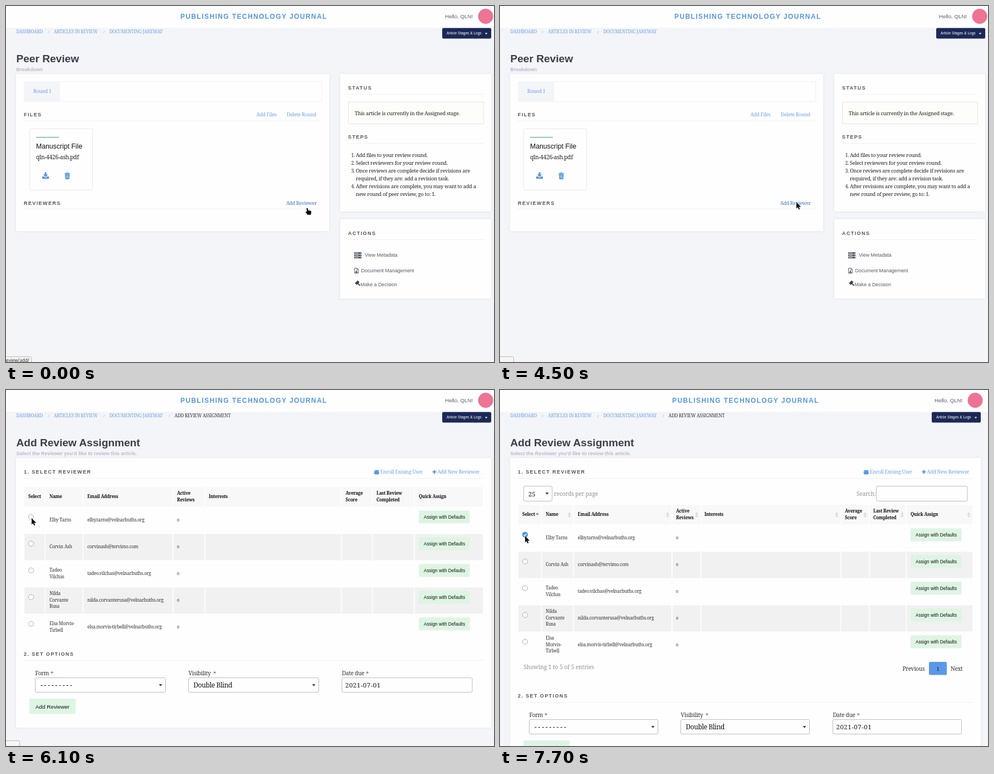
These frames come from a looping animation (876x639 px, 8000 ms). An HTML page:

```html
<!DOCTYPE html>
<html lang="en">
<head>
<meta charset="utf-8">
<title>Add a reviewer</title>
<style>
html, body { margin: 0; width: 100%; height: 100%; overflow: hidden; background: #f4f5f9; }
svg { display: block; width: 876px; height: 639px; }
text { white-space: pre; }
.s, .b { font-family: "Noto Serif", serif; letter-spacing: -.03em; }
.b { font-weight: 700; }
.w { font-family: "Noto Serif", serif; }
.n, .t, .h { font-family: "Liberation Sans", Arial, sans-serif; }
.t, .h { font-weight: 700; }
.h { letter-spacing: 1.4px; }
.u { font-family: "Noto Sans", sans-serif; }
.panel { filter: drop-shadow(0 0 2px rgba(40, 50, 80, .09)); }
</style>
</head>
<body>
<svg id="stage" viewBox="0 0 876 639"></svg>
<script>
(() => {
const LOOP = 8000, STEP = 100;
const BLUE = '#5596e3', LINK = '#6fa3e0', INK = '#333', GREEN = '#def5e3';

const text = (x, y, s, cls, size, fill = INK, more = '') =>
  `<text x="${x}" y="${y}" class="${cls}" font-size="${size}" fill="${fill}" ${more}>${s}</text>`;
const box = (x, y, x2, y2, fill, more = '') =>
  `<rect x="${x}" y="${y}" width="${x2 - x}" height="${y2 - y}" fill="${fill}" ${more}/>`;
const path = (d, fill, more = '') => `<path d="${d}" fill="${fill}" ${more}/>`;
const at = (x, y, s) => `<g transform="translate(${x} ${y})">${s}</g>`;
const rule = (x, x2, y) => box(x, y, x2, y + 1, '#f1f1f3');
const panel = (x, y, x2, y2) => box(x, y, x2, y2, '#fefefe', 'class="panel"');
const head = (x, y, s) => text(x, y, s, 'h', 9, '#555');
const lines = (x, mid, list, cls, size, gap, fill) => list.map((s, i) =>
  text(x, mid + 2.9 + (i - (list.length - 1) / 2) * gap, s, cls, size, fill)).join('');
const field = (x, y, x2, y2) =>
  box(x, y, x2, y2, '#fefefe', 'rx="2.5" stroke="#bdbdc1"');
const arrowDown = (x, y) => path(`M${x - 3} ${y - 2}h6l-3 4z`, '#444');

function banner(dx, crumbs) {
  let out = box(0, 0, 876, 39, '#fefefe')
    + text(313 + dx / 2, 23.2, 'PUBLISHING TECHNOLOGY JOURNAL', 'h', 12, BLUE)
    + text(788 + dx, 22, 'Hello, QLN!', 'n', 9.7, '#5a6070')
    + `<circle cx="${861 + dx}" cy="18.5" r="13.5" fill="#ee7394"/>`
    + box(783 + dx, 39.5, 871 + dx, 58.5, '#1b2957', 'rx="2.5"')
    + text(791 + dx, 51.4, 'Article Stages &amp; Logs', 'n', 6.55, '#fff')
    + path(`M${859.6 + dx} 48.5h4.8l-2.4 2.6z`, '#fff');
  const stops = [18.5, 86, 185.5, 302.5];
  crumbs.forEach((s, i) => {
    if (i) out += text(stops[i] - 10.5, 49, '/', 'n', 8, '#b3b5bd');
    out += text(stops[i], 48.6, s, 's', 8, i < 3 ? LINK : '#333');
  });
  return out;
}

const titles = (big, small) =>
  text(18.5, 101, big, 't', 19.1, '#3b3d4b') + text(18.5, 117.4, small, 't', 8.87, '#babcc6');
const trail = ['DASHBOARD', 'ARTICLES IN REVIEW', 'DOCUMENTING JANEWAY'];

const download = path('M-1.6-6h3.2v4h2.9L0 2.4-4.5-2h2.9z', BLUE)
  + path('M-6 1.6h3.3L-.8 3.4h1.6L2.7 1.6H6v4H-6z', BLUE);
const trash = path('M-5-4.8h3l.7-1.2h2.6l.7 1.2h3v1.4H-5z', BLUE)
  + path('M-4.2-2.8h8.4l-.5 8.2q0 .8-1 .8h-5.4q-1 0-1-.8z', BLUE)
  + path('M-1.9-1.2v5.6M0-1.2v5.6M1.9-1.2v5.6', 'none', 'stroke="#cfe0f7" stroke-width=".8"');
const server = [0, 4, 8].map(y => box(0, y, 13, y + 3, '#3f4654', 'rx=".6"')
  + box(1, y + 1, 8, y + 2, '#dfe1e6') + box(10.4, y + 1, 11.6, y + 2, '#fff')).join('');
const sheet = path('M.5.5h4.7l2.3 2.4v6.6h-7zM5 .5v2.6h2.5', 'none', 'stroke="#555" stroke-width=".9"')
  + path('M4 4v2h1.6L4 8 2.4 6H4zM2 8h4v.8H2z', '#555', 'stroke="#555" stroke-width=".5"');
const gavel = `<g transform="rotate(45)">${box(0, -4.4, 4.6, 2.6, '#444')}${box(4, -1.8, 9.4, .2, '#444')}</g>`;
const users = [[-3, -1.6, 1.4], [3, -1.6, 1.4], [0, -1.6, 2]].map(([x, y, r]) =>
  `<circle cx="${x}" cy="${y}" r="${r}" fill="${BLUE}"/>`).join('')
  + path('M-4.6 3V1.4q0-1.6 1.8-1.6h5.6q1.8 0 1.8 1.6V3L2.6 4.4h-5.2z', BLUE);
const plus = path('M-1-3.4h2V-1h2.4v2H1v2.4h-2V1h-2.4v-2H-1z', BLUE);

function overview() {
  const steps = [
    ['1.', 'Add files to your review round.'],
    ['2.', 'Select reviewers for your review round.'],
    ['3.', 'Once reviews are complete decide if revisions are'],
    ['', 'required, if they are: add a revision task.'],
    ['4.', 'After revisions are complete, you may want to add a'],
    ['', 'new round of peer review, go to: 1.']
  ];
  return banner(0, trail) + titles('Peer Review', 'Breakdown')
    + panel(18, 122, 580, 404)
    + box(32.5, 135.5, 566.5, 171.5, '#fefefe', 'stroke="#f1f1f4"')
    + box(32, 135, 97, 172, '#f4f5f9')
    + text(49, 156.2, 'Round 1', 's', 8.7, LINK)
    + head(32, 198, 'FILES') + rule(32, 566, 206)
    + text(449.5, 198, 'Add Files', 's', 8.8, LINK) + text(504, 198, 'Delete Round', 's', 8.8, LINK)
    + box(42.5, 220.5, 155.5, 330.5, '#fefefe', 'rx="2" stroke="#e9e9ec"')
    + box(54, 235, 95, 236.3, '#5fb585')
    + text(54, 256, 'Manuscript File', 'n', 12.24, '#111')
    + text(54, 275.4, 'qln-4426-ash.pdf', 's', 10.3, '#222')
    + at(71, 304.5, download) + at(110, 304.8, trash)
    + head(32, 356.6, 'REVIEWERS') + rule(32, 566, 364)
    + text(503, 356.6, 'Add Reviewer', 's', 8.7, '#3c78c0')
    + panel(600, 122, 871, 369)
    + head(614, 150, 'STATUS') + rule(614, 857, 158)
    + box(614.5, 172.5, 857.5, 211.5, '#fffdfa', 'rx="1.5" stroke="#e6e5e4"')
    + text(626, 196.4, 'This article is currently in the Assigned stage.', 's', 9.4, '#222')
    + head(614, 238, 'STEPS') + rule(614, 857, 246)
    + steps.map(([n, s], i) => text(626, 271 + 14 * i, n, 's', 8.4, '#222', 'text-anchor="end"')
      + text(628, 271 + 14 * i, s, 's', 9.25, '#222')).join('')
    + panel(600, 382.5, 871, 525)
    + head(614, 411, 'ACTIONS') + rule(614, 857, 419)
    + at(625, 442, server) + at(625, 470, sheet) + at(628.2, 495.6, gavel)
    + text(644, 450.3, 'View Metadata', 'n', 8.92, '#555c66')
    + text(637.5, 477.6, 'Document Management', 'n', 8.92, '#555c66')
    + text(636.5, 502.7, 'Make a Decision', 'n', 8.85, '#555c66');
}

const people = [
  [['Elby Tarns'], 'elby.tarns@velnarbuths.org'],
  [['Corvin Ash'], 'corvinash@tervimo.com'],
  [['Tadeo', 'Vilchas'], 'tadeo.vilchas@velnarbuths.org'],
  [['Nilda', 'Corvante', 'Rusa'], 'nilda.corvanterusa@velnarbuths.org'],
  [['Elsa Morvis-', 'Tirbell'], 'elsa.morvis-tirbell@velnarbuths.org']
];
const columns = [['Select'], ['Name'], ['Email Address'], ['Active', 'Reviews'], ['Interests'],
  ['Average', 'Score'], ['Last Review', 'Completed'], ['Quick Assign']];

function table(edges, labels, y) {
  let out = '';
  const band = (y1, y2, fill) => edges.slice(1).forEach((x, i) => {
    out += box(edges[i], y1, x - (i < 7 ? 1.6 : 0), y2, fill);
  });
  band(y, y + 35, '#f8f8f8');
  columns.forEach((c, i) => out += lines(labels[i], y + 17, c, 'b', 8, 12, '#111'));
  people.forEach(([name, mail], i) => {
    const mid = y + 59 + 48 * i, pin = mid - 5.2;
    if (i % 2) band(mid - 22.5, mid + 24.5, '#f1f1f1');
    const split = i === 4 && y > 200 ? ['Elsa', 'Morvis-', 'Tirbell'] : name;
    out += `<circle cx="45" cy="${pin}" r="4.6" fill="#fefefe" stroke="#a5a5a8" stroke-width=".9"/>`
      + lines(labels[1], mid, split, 's', 8.2, 11.5)
      + lines(labels[2], mid, [mail], 's', 8.25, 0)
      + text(labels[3], mid + 2.9, '0', 'w', 7.2)
      + box(labels[7], pin - 11.6, labels[7] + 91.5, pin + 11.6, GREEN, 'rx="2"')
      + text(labels[7] + 9, pin + 2.8, 'Assign with Defaults', 'n', 8.22, '#111');
  });
  return out;
}

const choices = (xs, y) => text(xs[0] + 9.5, y + 18, '---------', 'w', 12, '#111', 'style="letter-spacing:2.9px"')
  + text(xs[1] + 9, y + 18, 'Double Blind', 's', 11.9, '#111');

function form(xs, w, y, right) {
  const labels = [['Form', 27.5], ['Visibility', 44.5], ['Date due', 43]];
  return head(32, y - 39.5, '2. SET OPTIONS') + rule(32, right, y - 31)
    + xs.map((x, i) => text(x, y - 4.5, labels[i][0], 's', 10.1, '#333')
      + text(x + labels[i][1], y - 3.5, '*', 's', 10.5, '#c0392b')
      + field(x, y + .5, x + w, y + 26.5)
      + (i < 2 ? arrowDown(x + w - 9, y + 14) : '')).join('')
    + text(xs[2] + 6, y + 18, '2021-07-01', 'w', 11.5, '#222', 'style="letter-spacing:.5px"')
    + box(42, y + 38, 125, y + 65.5, GREEN, 'rx="2"')
    + text(53, y + 55.5, 'Add Reviewer', 'n', 9.8, '#111');
}

function assignment(dx, bottom) {
  const right = 857 + dx;
  return banner(dx, [...trail, 'ADD REVIEW ASSIGNMENT'])
    + titles('Add Review Assignment', "Select the Reviewer you'd like to review this article.")
    + panel(18, 122, 871 + dx, bottom)
    + head(32, 150, '1. SELECT REVIEWER') + rule(32, right, 158)
    + at(665.3 + dx, 147, users) + text(672 + dx, 150.2, 'Enroll Exising User', 's', 8.9, LINK)
    + at(769 + dx, 147, plus) + text(774.5 + dx, 150.2, 'Add New Reviewer', 's', 8.8, LINK);
}

const plainXs = [52.5, 327.5, 603], gridXs = [52.5, 324.5, 597.5];

const plainPage = () => assignment(0, 606)
  + table([33, 71, 139, 300.5, 358, 602.5, 658.5, 734, 856], [40, 78, 146, 307, 364, 609.5, 665, 741], 174)
  + form(plainXs, 234, 516, 857) + choices(plainXs, 516);

const gridPage = () => assignment(-8, 660)
  + field(42.5, 172.5, 93.5, 199.5) + text(51, 191, '25', 'w', 11.2, '#111') + arrowDown(84.5, 186)
  + text(97, 190.2, 'records per page', 'w', 9.9, '#8f8f92')
  + text(640, 190.2, 'Search:', 'w', 9.9, '#8f8f92') + field(675.5, 172.5, 839, 199.5)
  + table([33, 75, 132.5, 309.5, 361.5, 612.5, 663.5, 730, 848], [40, 82, 139.5, 316, 367, 619, 670, 737], 206)
  + text(722.5, 503.5, 'Previous', 's', 10.1) + text(809, 503.5, 'Next', 's', 10.1)
  + box(770, 488, 802, 511.5, '#5a98e8', 'rx="2"')
  + text(786, 503.5, '1', 's', 9.5, '#222', 'text-anchor="middle"')
  + form(gridXs, 231, 591, 848);

const sorters = () => path('M63.8 224h6.4l-3.2-4z', '#7093d0')
  + [124.5, 301, 353, 604.5, 655.5, 722, 841.5].map(x =>
    path(`M${x - 2.8} 223.2h5.6l-2.8-4zM${x - 2.8} 224.8h5.6l-2.8 4z`, '#d6d6d9')).join('')
  + text(42.5, 500.5, 'Showing 1 to 5 of 5 entries', 'w', 10.1, '#8f8f92')
  + choices(gridXs, 591);

const bubble = (w, s = '') => box(-2, 629.5, w, 645, '#f6f6f6', 'rx="2" stroke="#b9b9bc"')
  + text(0, 639, s, 'u', 8.1, '#333');

const tick = '<circle cx="45" cy="259.8" r="5" fill="#4b92df"/>'
  + path('M42.6 260l1.8 1.9 3.2-3.8', 'none', 'stroke="#fff" stroke-width="1.4"');
const rim = 'stroke="#fff" stroke-width=".9" stroke-linejoin="round" paint-order="stroke"';
const arrow = path('M0 0V11.6L2.6 9.2 4.4 13.3 6.3 12.5 4.6 8.5H8.3Z', '#111', rim);
const hand = path('M-1.2.2Q.4-1 1.4.6L1.9 3.8 6 4.6Q7.8 5 7.5 7.5L6.6 11.8H.8L-2.7 7.2Q-2.4 5.4-.4 6.4Z', '#111', rim);

// Each layer: markup and the time span(s) in which it shows.
const layers = [
  [overview(), [0, 4800]],
  [plainPage(), [4800, 6300]],
  [gridPage(), [6300, LOOP]],
  [sorters(), [6400, LOOP]],
  [tick, [7200, LOOP]],
  [bubble(45.5, 'eview/add/'), [0, 3600]],
  [bubble(24.5), [3600, 6300]],
  [arrow, [4500, 6300], [6600, LOOP]],
  [hand, [0, 4500], [6300, 6600]]
];

// Pointer moves: start, number of steps, end point.
const home = [540.5, 363];
const moves = [
  [600, 6, 532, 352], [5400, 3, 425, 412], [5800, 4, 46, 230], [6300, 1, 42, 229],
  [6400, 5, 42, 265], [7100, 3, 43, 261], [7700, 1, 45, 262]
];

function pointer(t) {
  let [x, y] = home;
  for (const [start, n, toX, toY] of moves) {
    if (t < start) break;
    const k = Math.min(n, Math.floor((t - start) / STEP) + 1) / n;
    const e = k * k * (3 - 2 * k);
    x += (toX - x) * e;
    y += (toY - y) * e;
  }
  return [x, y];
}

const stage = document.getElementById('stage');
stage.innerHTML = layers.map(([s]) => `<g>${s}</g>`).join('');
const groups = [...stage.children];

function draw() {
  const t = performance.now() % LOOP;
  layers.forEach(([, ...spans], i) => {
    const on = spans.some(([a, b]) => t >= a && t < b);
    groups[i].style.display = on ? '' : 'none';
  });
  const place = `translate(${pointer(t).join(' ')})`;
  groups.slice(-2).forEach(g => g.setAttribute('transform', place));
  requestAnimationFrame(draw);
}
draw();
})();
</script>
</body>
</html>
```
